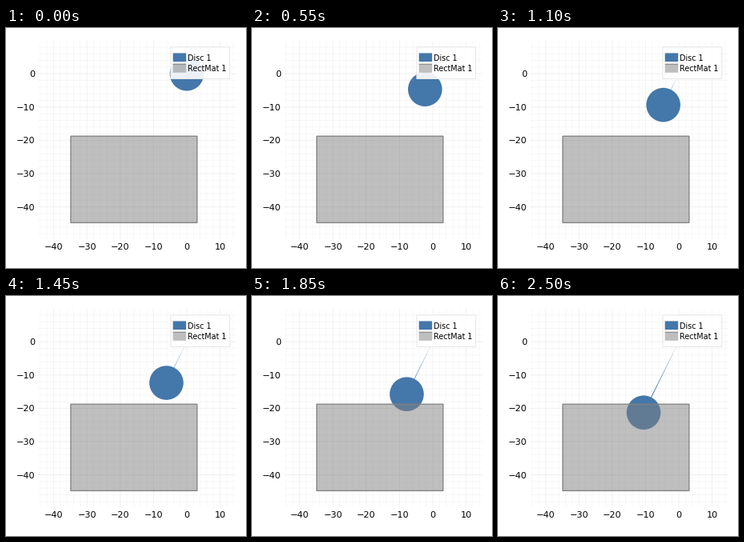
Animation of 300 by 300 pixels, one loop 2.55 s. Source, as a matplotlib script:

```python
import matplotlib.pyplot as plt
from matplotlib.animation import FuncAnimation
from matplotlib.patches import Circle, Polygon, Rectangle

SIZE, DPI = 300, 100
FRAMES, INTERVAL = 51, 50
PX = 72 / DPI                      # one pixel in points
SCALE = 4.16                       # pixels per data unit
X0, Y0 = 226.0, 57.2               # pixel position of the data origin
LEFT, RIGHT, TOP, BOTTOM = 40, 288, 16, 264
RADIUS = 21.3
STEP = (-0.88, 1.77)               # disc movement per frame in pixels
TRAIL_WIDTH = 1.3                  # width reached at the end of the loop
BLUE, GRAY = "#4477aa", "#808080"


def px(x):
    return X0 + SCALE * x


def py(y):
    return Y0 - SCALE * y


fig = plt.figure(figsize=(SIZE / DPI, SIZE / DPI), dpi=DPI, facecolor="white")
ax = fig.add_axes([0, 0, 1, 1])
ax.set_xlim(0, SIZE)
ax.set_ylim(SIZE, 0)
ax.axis("off")


def line(xs, ys, color, width, **kw):
    ax.plot(xs, ys, color=color, lw=width * PX, solid_capstyle="butt",
            snap=False, **kw)


def label(x, y, text, size, **kw):
    ax.text(x, y, text, family="DejaVu Sans", fontsize=size * PX,
            color="black", va="baseline", **kw)


def box(left, top, right, bottom, **kw):
    ax.add_patch(Rectangle((left, top), right - left, bottom - top,
                           snap=False, **kw))


def draw_grid():
    for v in range(-48, 15, 2):
        alpha = 0.055 if v % 10 == 0 else 0.028
        if LEFT <= px(v) <= RIGHT:
            line([px(v)] * 2, [TOP, BOTTOM], "black", 1, alpha=alpha, zorder=1)
        if TOP <= py(v) <= BOTTOM:
            line([LEFT, RIGHT], [py(v)] * 2, "black", 1, alpha=alpha, zorder=1)


def draw_ticks():
    for v in range(-40, 11, 10):
        text = str(v).replace("-", "\u2212")
        label(px(v), 277, text, 11.2, ha="center")
        if v <= 0:
            label(36.5, py(v) + 4, text, 11.2, ha="right")


def draw_mat():
    edges = 80.9, 135.2, 238.9, 243.4
    box(*edges, fc=GRAY, ec="none", alpha=0.5, zorder=4)
    box(*edges, fc="none", ec=GRAY, lw=1.3 * PX, zorder=5)


def draw_legend():
    edges = 205.9, 23.8, 279.7, 63.5
    box(*edges, fc="white", ec="none", alpha=0.9, zorder=6)
    box(*edges, fc="none", ec="#e6e6e6", lw=PX, zorder=6)
    box(208.7, 31.4, 225.1, 42.1, fc=BLUE, ec="none", zorder=7)
    box(208.7, 45, 225.1, 55.8, fc=GRAY, ec="none", alpha=0.5, zorder=7)
    line([208.7, 225.1], [45.2, 45.2], GRAY, 1, zorder=8)
    label(227, 41, "Disc 1", 9.7, zorder=8)
    label(227, 54.5, "RectMat 1", 9.7, zorder=8)


draw_grid()
draw_ticks()
draw_mat()
draw_legend()
trail = ax.add_patch(Polygon([(X0, Y0)] * 3, fc=BLUE, ec="none", zorder=2))
disc = ax.add_patch(Circle((X0, Y0), RADIUS, fc=BLUE, ec="none", zorder=3))

# Unit normal to the direction of travel
length = (STEP[0] ** 2 + STEP[1] ** 2) ** 0.5
NORMAL = (-STEP[1] / length, STEP[0] / length)


def update(i):
    cx, cy = X0 + STEP[0] * i, Y0 + STEP[1] * i
    # The trail widens steadily with the distance from its start
    half = TRAIL_WIDTH / 2 * i / (FRAMES - 1)
    dx, dy = NORMAL[0] * half, NORMAL[1] * half
    disc.center = cx, cy
    trail.set_xy([(X0, Y0), (cx + dx, cy + dy), (cx - dx, cy - dy)])
    return trail, disc


anim = FuncAnimation(fig, update, frames=FRAMES, interval=INTERVAL,
                     repeat=True, repeat_delay=0, blit=False)
plt.show()
```
